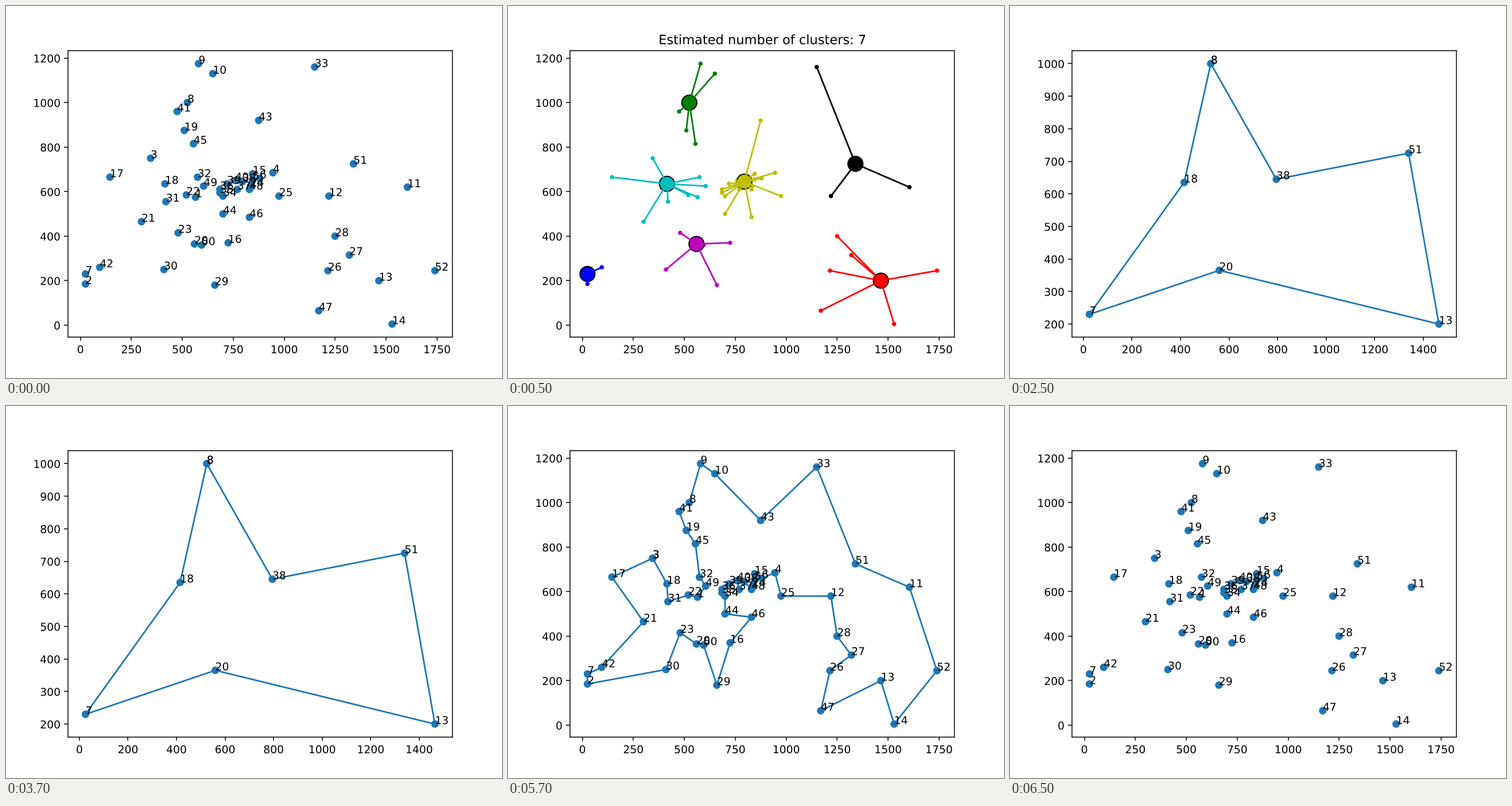
Write a matplotlib script that moves like this. It is 864 px wide and 648 px high and loops after 8000 ms.

```python
import numpy as np
import matplotlib.pyplot as plt
from matplotlib.animation import FuncAnimation
from matplotlib.patheffects import Normal

# Path effects draw markers and text at sub-pixel positions
plt.rcParams.update({
    "font.family": "DejaVu Sans",
    "path.snap": False,
    "path.effects": [Normal()],
})

STEP_MS = 500
LOOP_MS = 8000

# City positions, labelled from 1; clusters and tours are computed from them
CITIES = np.array([
    (565, 575), (25, 185), (345, 750), (945, 685), (845, 655), (880, 660),
    (25, 230), (525, 1000), (580, 1175), (650, 1130), (1605, 620),
    (1220, 580), (1465, 200), (1530, 5), (845, 680), (725, 370),
    (145, 665), (415, 635), (510, 875), (560, 365), (300, 465),
    (520, 585), (480, 415), (835, 625), (975, 580), (1215, 245),
    (1320, 315), (1250, 400), (660, 180), (410, 250), (420, 555),
    (575, 665), (1150, 1160), (700, 580), (685, 595), (685, 610),
    (770, 610), (795, 645), (720, 635), (760, 650), (475, 960),
    (95, 260), (875, 920), (700, 500), (555, 815), (830, 485),
    (1170, 65), (830, 610), (605, 625), (595, 360), (1340, 725),
    (1740, 245),
])
LABELS = np.arange(1, len(CITIES) + 1)
CENTERS = np.array([7, 8, 13, 18, 20, 38, 51])


def distances(a, b):
    return np.linalg.norm(a[:, None] - b, axis=2)


def two_opt(tour, dist):
    """Reverse the most rewarding stretch until no reversal helps."""
    while True:
        following = np.roll(tour, -1)
        edge = dist[tour, following]
        gain = (edge[:, None] + edge - dist[np.ix_(tour, tour)]
                - dist[np.ix_(following, following)])
        np.fill_diagonal(gain, 0)
        i, j = sorted(np.unravel_index(gain.argmax(), gain.shape))
        if gain[i, j] < 1e-9:
            return tour
        tour[i + 1:j + 1] = tour[i + 1:j + 1][::-1].copy()


def shortest_tour(labels):
    """Iterated local search: swap two random stretches, then repair."""
    rng = np.random.default_rng(1)
    xy = CITIES[labels - 1]
    dist = distances(xy, xy)
    count = len(labels)

    def length(tour):
        return dist[tour, np.roll(tour, -1)].sum()

    best = two_opt(np.arange(count), dist)
    for _ in range(60 * count):
        base = np.roll(best, rng.integers(count))
        a, b, c = np.sort(rng.choice(np.arange(1, count), 3, replace=False))
        trial = np.concatenate([base[:a], base[b:c], base[a:b], base[c:]])
        trial = two_opt(trial, dist)
        if length(trial) <= length(best) + 1e-9:
            best = trial
    return labels[best]


CENTER_TOUR = shortest_tour(CENTERS)
FULL_TOUR = shortest_tour(LABELS)

fig, ax = plt.subplots(figsize=(6.4, 4.8), dpi=135)


def draw_labelled(labels, style):
    xy = CITIES[labels - 1]
    ax.plot(*xy.T, style, color="C0")
    for label, (x, y) in zip(labels, xy):
        ax.text(x, y, str(label))


def draw_tour(tour):
    draw_labelled(np.append(tour, tour[0]), "o-")


def draw_clusters():
    centers = CITIES[CENTERS - 1]
    nearest = distances(CITIES, centers).argmin(axis=1)
    for k, (center, color) in enumerate(zip(centers, "bgrcmyk")):
        members = CITIES[nearest == k]
        ax.plot(*members.T, color + ".")
        ax.plot(*center, "o", mfc=color, mec="k", ms=14)
        for member in members:
            ax.plot(*zip(center, member), color)
    ax.set_title(f"Estimated number of clusters: {len(CENTERS)}")


def update(frame):
    ms = frame * STEP_MS
    ax.clear()
    if 500 <= ms < 2500:
        draw_clusters()
    elif 2500 <= ms < 4500:
        draw_tour(CENTER_TOUR)
    elif 4500 <= ms < 6500:
        draw_tour(FULL_TOUR)
    else:
        draw_labelled(LABELS, "o")


anim = FuncAnimation(fig, update, frames=LOOP_MS // STEP_MS,
                     interval=STEP_MS, repeat=True, repeat_delay=0)
plt.show()
```
